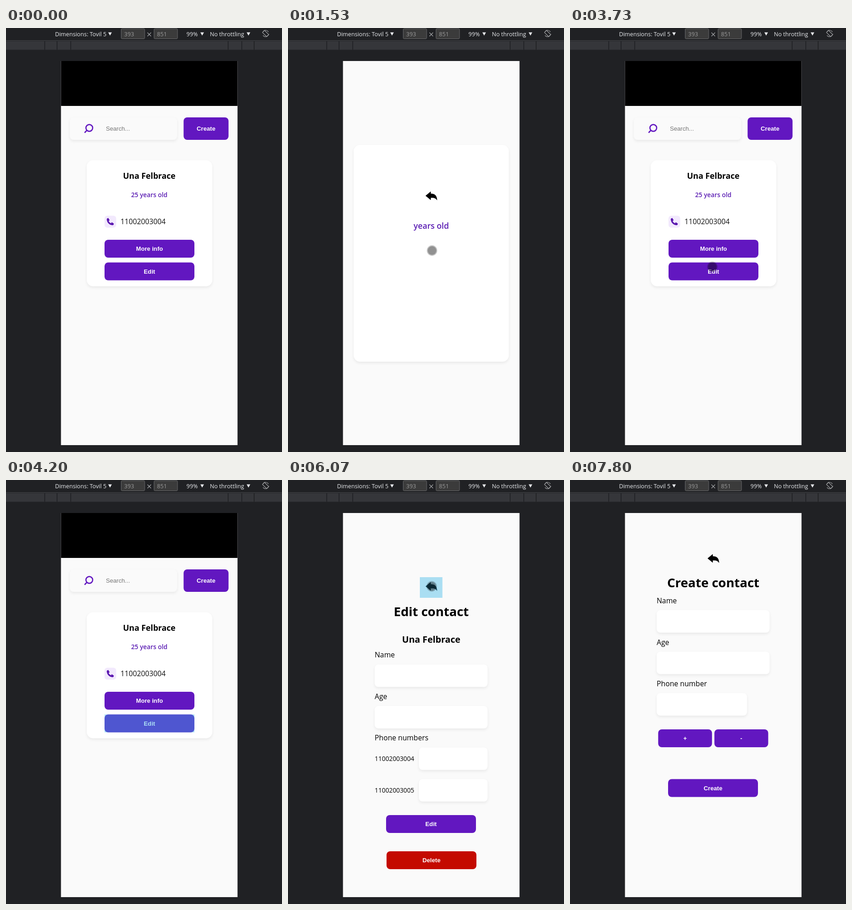
An HTML page with a canvas that plays this animation: 605x925 px, repeating every 8 s.

```html
<!DOCTYPE html>
<html lang="en">
<head>
<meta charset="utf-8">
<title>Contacts on a phone</title>
<style>
html, body { margin: 0; width: 100%; height: 100%; overflow: hidden; background: #202124; }
canvas { display: block; width: 605px; height: 925px; }
</style>
</head>
<body>
<canvas id="stage"></canvas>
<script>
const W = 605, H = 925, LOOP = 8000;
const canvas = document.getElementById('stage');
const ratio = window.devicePixelRatio || 1;
canvas.width = W * ratio;
canvas.height = H * ratio;
const c = canvas.getContext('2d', { alpha: false });

const PURPLE = '#6217c0', RED = '#c40a00', PAPER = '#fafafa', MID = 314;
const SANS = '"Open Sans", "Noto Sans", sans-serif';
const ARIAL = '"Liberation Sans", Arial, sans-serif';
const ZOOM = 0.985;
const PERSON = 'Una Felbrace';
const PHONES = ['11002003004', '11002003005'];

function rect(x, y, w, h, color) {
  c.fillStyle = color;
  c.fillRect(x, y, w, h);
}

function round(x, y, w, h, r, color) {
  c.beginPath();
  c.roundRect(x, y, w, h, r);
  c.fillStyle = color;
  c.fill();
}

function raised(x, y, w, h, r, color = '#fff') {
  c.save();
  c.shadowColor = 'rgba(0,0,0,0.07)';
  c.shadowBlur = 6 * ratio;
  c.shadowOffsetY = 3 * ratio;
  round(x, y, w, h, r, color);
  c.restore();
}

// Text whose capitals are centred on y.
function text(str, x, y, size, { color = '#000', weight = 400, align = 'left', font = SANS } = {}) {
  c.font = `${weight} ${size}px ${font}`;
  c.fillStyle = color;
  c.textAlign = align;
  c.fillText(str, x, Math.round(y + size * 0.357));
}

const label = (str, y) => text(str, 190, y, 16 * ZOOM);
const heading = (str, y, px) => text(str, MID, y, px * ZOOM, { weight: 700, align: 'center' });
const ageText = (str, y, px) =>
  text(str, MID, y, px * ZOOM, { weight: 600, align: 'center', color: '#5c1fb4' });

function button(str, x, y, w = 197, h = 39, color = PURPLE) {
  round(x, y, w, h, 8, color);
  text(str, x + w / 2, y + h / 2, 13.333 * ZOOM,
    { color: '#fff', weight: 700, align: 'center', font: ARIAL });
}

const field = (x, y, w) => raised(x, y, w, 49, 8);

function shape(x, y, path, color) {
  c.save();
  c.translate(x, y);
  c.fillStyle = color;
  c.fill(new Path2D(path));
  c.restore();
}

const backArrow = y => shape(314.5, y,
  'M-13 0L-1.5-9.5V-4.8C7-4.8 12-1 12.5 10C9 5 6 4 -1.5 4.5V9.5Z', '#000');

function phoneRow(number, y) {
  round(216, y - 13, 25.5, 26, 6, '#f2e9fd');
  shape(228.5, y,
    'M-7.7-5.7Q-7-7.6-4.2-8L-1.3-3.2L-3.5-1.3Q-2 2 1.6 3.4L3.4 1.2L8 4.2Q7.7 7 5.8 7.8C-2 7.7-7.6 2-7.7-5.7Z', '#5b18b0');
  text(number, 251, y, 16 * ZOOM, { color: '#111' });
}

function home() {
  rect(120.5, 72, 387, 98, '#000');
  raised(140, 195, 235, 49, 8, PAPER);
  c.strokeStyle = PURPLE;
  c.lineWidth = 2.6;
  c.beginPath();
  c.arc(182.6, 218, 7.4, 0, 7);
  c.moveTo(177, 223.5);
  c.lineTo(172.3, 228.5);
  c.stroke();
  text('Search...', 219, 219.5, 13.333 * ZOOM, { color: '#757575', font: ARIAL });
  button('Create', 389.3, 195, 98.5, 49);
  raised(177, 288.5, 275.3, 275, 14);
  heading(PERSON, 323, 18);
  ageText('25 years old', 364.5, 14);
  phoneRow(PHONES[0], 422.5);
  button('More info', 216, 462);
  button('Edit', 216, 511.5);
}

function infoCard(loaded) {
  raised(144, 255, 340, 473, 14);
  if (!loaded) {
    backArrow(366);
    ageText('years old', 432, 18);
    return;
  }
  backArrow(338);
  heading(PERSON, 403, 20);
  ageText('25 years old', 462, 18);
  phoneRow(PHONES[0], 560);
  phoneRow(PHONES[1], 633);
}

function editForm() {
  backArrow(232);
  heading('Edit contact', 287, 28);
  heading(PERSON, 347.5, 20);
  label('Name', 381.5);
  field(190, 402.5, 247.5);
  label('Age', 472);
  field(190, 493, 247.5);
  label('Phone numbers', 562.5);
  PHONES.forEach((number, i) => {
    const y = 583.5 + i * 69;
    text(number, 190, y + 25, 14 * ZOOM);
    field(287, y, 150.5);
  });
  button('Edit', 215, 731);
  button('Delete', 216, 810, 197, 39, RED);
}

function createForm() {
  backArrow(171);
  heading('Create contact', 224, 28);
  label('Name', 263);
  field(190, 284, 247.5);
  label('Age', 354);
  field(190, 374.5, 247.5);
  label('Phone number', 444);
  field(190, 465, 198);
  button('+', 193.3, 544, 118);
  button('-', 316.5, 544, 118);
  button('Create', 215, 652.5);
}

const pages = {
  home,
  blank: () => infoCard(false),
  info: () => infoCard(true),
  edit: editForm,
  create: createForm
};

function triangle(x) {
  shape(x, 9.5, 'M0 0H8L4 7Z', '#e8eaed');
}

function toolbar() {
  const light = { color: '#e8eaed' }, size = 12.6;
  rect(0, 0, W, H, '#202124');
  text('Dimensions: Tovil 5', 107.5, 13.5, size, light);
  text('99%', 395.5, 13.5, size, light);
  text('No throttling', 447, 13.5, size, light);
  [224, 426, 527.5].forEach(triangle);
  for (const [x, value] of [[252, '393'], [324, '851']]) {
    c.beginPath();
    c.roundRect(x + 0.5, 1.5, 51.5, 22, 2);
    c.fillStyle = '#3b3b3b';
    c.fill();
    c.strokeStyle = '#68696b';
    c.lineWidth = 1;
    c.stroke();
    text(value, x + 7, 13.5, size, { color: '#9b9b9b' });
  }
  c.strokeStyle = '#a8a9ab';
  c.lineWidth = 1.1;
  c.beginPath();
  c.moveTo(310, 10);
  c.lineTo(318, 18);
  c.moveTo(318, 10);
  c.lineTo(310, 18);
  c.stroke();

  // Rotate-screen icon
  c.save();
  c.translate(569, 12);
  c.beginPath();
  c.arc(0, 0, 7, -2.5, -0.5);
  c.moveTo(6.1, 3.4);
  c.arc(0, 0, 7, 0.5, 2.5);
  c.stroke();
  c.rotate(Math.PI / 4);
  c.strokeRect(-6.5, -3.2, 13, 6.4);
  c.restore();

  rect(0, 27, W, 1, '#4a4c50');
  rect(0, 29, W, 18.5, '#35363a');
  [84, 111, 141, 486, 516, 543].forEach(x => rect(x, 29, 1.7, 18.5, '#202124'));
}

function touch(x, y) {
  c.beginPath();
  c.arc(x, y, 11.4, 0, 7);
  c.fillStyle = 'rgba(0,0,0,0.23)';
  c.fill();
  c.beginPath();
  c.arc(x, y, 9.4, 0, 7);
  c.fillStyle = 'rgba(0,0,0,0.26)';
  c.fill();
}

function pointer() {
  shape(5, 579, 'M0 0V17L4 13.4L6.6 19L9.2 18L6.8 12H12Z', '#000');
  shape(5, 579, 'M1 2.4V14.7L4.3 11.8L7 17.6L8 17.2L5.3 11H9.6Z', '#fff');
}

const taps = {
  more: [216, 462, 197, 39],
  edit: [216, 511.5, 197, 39],
  create: [375, 195, 113, 49],
  infoBack: [289, 318.5, 49.5, 45],
  editBack: [289, 212, 49.5, 45]
};

// start time, page, touch point, tapped area
const steps = [
  [0, 'home'],
  [1000, 'home', [313.8, 491.5]],
  [1070, 'home', [314, 490.5]],
  [1130, 'home', [314.4, 489]],
  [1200, 'home', [314.9, 487.5]],
  [1270, 'home', [315.3, 486.3]],
  [1330, 'home', [315.7, 485.5]],
  [1470, 'home', [315.7, 485.5], 'more'],
  [1530, 'blank', [315.7, 485.5]],
  [1600, 'info', [315.7, 485.5]],
  [1870, 'info'],
  [2270, 'info', [325.5, 342]],
  [2330, 'info'],
  [2470, 'info', [321.5, 338]],
  [2670, 'info', [320.5, 335.5], 'infoBack'],
  [2930, 'home', [320.5, 335.5]],
  [3400, 'home'],
  [3730, 'home', [312, 521]],
  [3870, 'home'],
  [4070, 'home', null, 'edit'],
  [4270, 'edit'],
  [4330, 'edit', [316.7, 532.3]],
  [5200, 'edit'],
  [5530, 'edit', [323.5, 240.5]],
  [5600, 'edit'],
  [5870, 'edit', [315, 232]],
  [5930, 'edit', [315, 232], 'editBack'],
  [6130, 'home', [315, 232]],
  [6600, 'home'],
  [6670, 'home', [420.5, 224.5]],
  [6730, 'home', null, 'create'],
  [6870, 'create', [420.5, 224.5]],
  [7800, 'create']
];

function draw(t) {
  const [, page, spot, tap] = steps.findLast(step => step[0] <= t);
  c.setTransform(ratio, 0, 0, ratio, 0, 0);
  toolbar();
  rect(120.5, 72, 387, 838, PAPER);
  pages[page]();
  if (tap) rect(...taps[tap], 'rgba(51,181,229,0.4)');
  if (spot) touch(...spot);
  if (t >= 470 && t < 530) pointer();
}

const start = performance.now();
function tick() {
  draw((performance.now() - start) % LOOP);
  requestAnimationFrame(tick);
}
tick();
</script>
</body>
</html>
```
